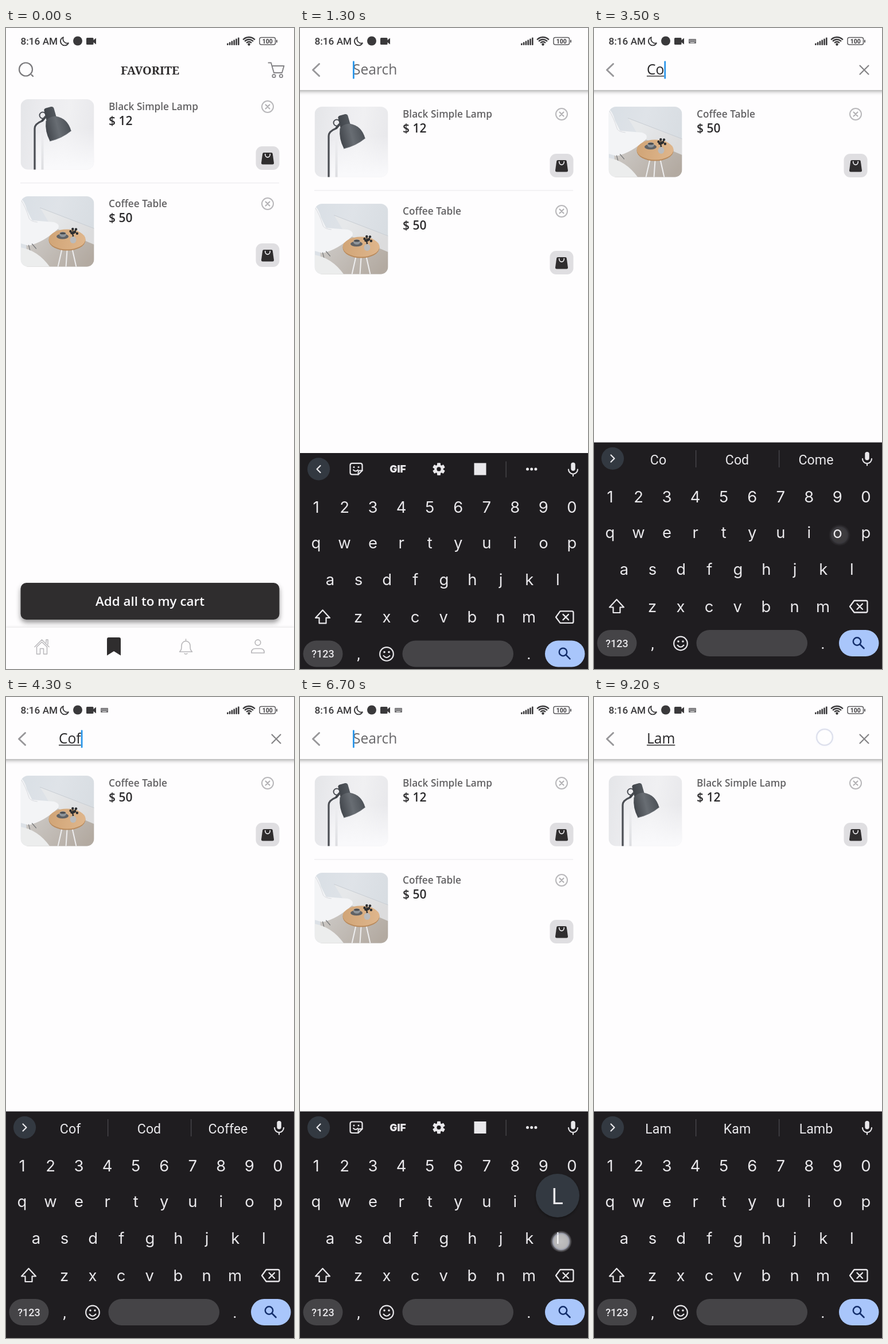
Write an HTML page with a canvas that moves like this. It is 502 px wide and 1116 px high and loops after 9.3 s.

```html
<!DOCTYPE html>
<html lang="en">
<head>
<meta charset="utf-8">
<title>Favorite search</title>
<style>
  html, body { margin: 0; width: 100%; height: 100%; overflow: hidden; background: #fefdfe; }
  canvas { display: block; width: 502px; height: 1116px; }
</style>
</head>
<body>
<canvas id="stage" width="502" height="1116"></canvas>
<script>
const W = 502, H = 1116, LOOP = 9300, STEP = 100;
const SANS = '"Open Sans", "Noto Sans", sans-serif';
const UI = 'Roboto, "Noto Sans", sans-serif';
const KEY = 'Inter, Roboto, sans-serif';
const SERIF = '"Noto Serif", serif';
const PAPER = '#fefdfe', INK = '#2f2d2e', KEYS = '#1f1d20', LIGHT = '#e9e8eb';

const screen = document.getElementById('stage').getContext('2d');
const layerCanvas = document.createElement('canvas');
layerCanvas.width = W;
layerCanvas.height = H;
const layer = layerCanvas.getContext('2d');
let c = screen;

// Drawing helpers
function fill(d, color) {
  c.fillStyle = color;
  c.fill(new Path2D(d));
}
function line(d, color, width) {
  c.strokeStyle = color;
  c.lineWidth = width;
  c.lineCap = c.lineJoin = 'round';
  c.stroke(new Path2D(d));
}
function box(x, y, w, h, r, color) {
  c.fillStyle = color;
  c.beginPath();
  c.roundRect(x, y, w, h, r);
  c.fill();
}
function oval(x, y, rx, ry, color) {
  c.fillStyle = color;
  c.beginPath();
  c.ellipse(x, y, rx, ry, 0, 0, 7);
  c.fill();
}
function dot(x, y, r, color) {
  oval(x, y, r, r, color);
}
function ring(x, y, r, color, width) {
  c.strokeStyle = color;
  c.lineWidth = width;
  c.beginPath();
  c.arc(x, y, r, 0, 7);
  c.stroke();
}
function text(s, x, y, font, color, align = 'left') {
  c.font = font;
  c.fillStyle = color;
  c.textAlign = align;
  c.fillText(s, x, y);
}
function blend(x0, y0, x1, y1, ...colors) {
  const g = c.createLinearGradient(x0, y0, x1, y1);
  colors.forEach((color, i) => g.addColorStop(i / (colors.length - 1), color));
  return g;
}
function shadow(color, blur, dy) {
  c.shadowColor = color;
  c.shadowBlur = blur;
  c.shadowOffsetY = dy;
}
function at(x, y, draw) {
  c.save();
  c.translate(x, y);
  draw();
  c.restore();
}

// Pictures, drawn in a 128 x 123 box
function lampPhoto() {
  fill('M0 0H128V123H0z', blend(0, 0, 128, 20, '#e4e5e8', '#ececef', '#f0f0f2', '#e9e9ec'));
  fill('M28 123V60L128 40V123z', blend(0, 50, 0, 118, 'rgba(249,249,251,0)', '#f9f9fb'));
  line('M38 123V54', blend(0, 54, 0, 123, 'rgba(190,192,197,0)', 'rgba(190,192,197,.5)'), 4);
  line('M24.5 124V51Q24.5 43 37 38', '#4b4e54', 3.2);
  line('M38 37L43 31', '#3d4147', 4);
  ring(38.5, 28, 5.5, '#4b4e54', 2);
  fill('M41 20Q40 17 44 15.5L53 13Q57 12.5 58 16L62 30 45 37z', blend(41, 24, 61, 20, '#3f4349', '#555a60'));
  fill('M44 38Q49 30 61 29.5Q82 33 88 55Q72 68 51 73Q42 56 44 38z', blend(44, 52, 84, 42, '#43474d', '#686d73', '#4d5258'));
  line('M51 73Q72 68 88 55', '#70757b', 1);
}
function tablePhoto() {
  fill('M0 0H128V123H0z', blend(0, 0, 128, 40, '#d9dfe5', '#dfe3e8', '#d8dde2'));
  fill('M34 20L128 56V84L58 60z', blend(60, 30, 110, 75, '#e6e8ea', '#dcdcdd'));
  line('M34 20L128 56', '#c8cdd3', 1);
  fill('M10 78L62 56 128 84V123H10z', blend(40, 60, 110, 123, '#cac6c2', '#b3aaa1'));
  fill('M0 4Q7 8 11 24L20 42 58 45Q70 49 65 57Q40 80 14 86L0 82z', '#f3f4f6');
  line('M1 7Q8 17 15 39Q18 44 29 45', '#d8dade', 1);
  line('M14 85L17 97M20 83L27 91', '#77787a', 1.2);
  fill('M0 89Q30 94 51 123H0z', '#eceded');
  line('M72 92L65 123M81 94L79 123M90 92L97 123', '#eeeeef', 2);
  oval(81, 76.5, 32, 18, '#b98a5c');
  oval(81, 75, 32, 17.5, blend(50, 70, 113, 78, '#d1a577', '#dfb68c'));
  oval(73, 70, 10.5, 4.5, '#606265');
  oval(73.5, 66.5, 6, 4.5, '#8f959a');
  oval(73.5, 64.5, 5, 1.8, '#4b4d50');
  line('M91 72V58M91 66L97 57M92 69L87 60', '#2d2e30', 1.8);
  for (let i = 0; i < 7; i++) dot(87 + i * 1.9, 61 + 4 * Math.sin(i * 2.3), 2.2, '#2d2e30');
  oval(91.5, 76, 5.5, 6, '#bbbbbc');
}

const lamp = { name: 'Black Simple Lamp', price: '$ 12', photo: lampPhoto };
const table = { name: 'Coffee Table', price: '$ 50', photo: tablePhoto };

function photos(items, top) {
  items.forEach((item, i) => at(25.5, top + i * 169, () => {
    c.beginPath();
    c.roundRect(0, 0, 128, 122.5, 13);
    c.clip();
    item.photo();
  }));
}
function details(items, top) {
  items.forEach((item, i) => at(0, top + i * 169, () => {
    text(item.name, 179, 18.5, '600 17.2px ' + SANS, '#636264');
    text(item.price, 179, 45, '600 21px ' + SANS, '#2c2b2d');
    ring(456, 13, 10, '#b9b8bb', 2);
    line('M452.5 9.5l7 7m0-7l-7 7', '#b0afb2', 2);
    box(435.5, 82, 41, 41, 11, '#dfdee1');
    fill('M449.5 93h13q2 0 2.3 2l2.2 16q0 2.5-2.5 2.5h-17q-2.5 0-2.5-2.5l2.2-16q.3-2 2.3-2z', INK);
    line('M451.7 95.5c0 7.5 8.6 7.5 8.6 0', '#eeedf0', 1.7);
    if (i < items.length - 1) box(25, 145, 451, 1.5, 0, '#efeef1');
  }));
}

function favoritePage() {
  box(0, 0, W, H, 0, PAPER);
  ring(34.5, 72, 11.5, '#7a797c', 2.2);
  line('M44.5 81.5l2.5 2.5', '#7a797c', 2.4);
  text('FAVORITE', 251, 81, '700 20px ' + SERIF, INK, 'center');
  line('M457.5 60.5h4.5l5 17.5h14l3.5-12H464', '#858487', 2);
  ring(467, 83.5, 2.7, '#858487', 1.8);
  ring(479.5, 83.5, 2.7, '#858487', 1.8);
  details([lamp, table], 124);

  c.save();
  shadow('rgba(0,0,0,.42)', 9, 5);
  box(25.5, 966, 451, 64, 10, INK);
  c.restore();
  text('Add all to my cart', 251, 1006, '600 22.4px ' + SANS, '#fbfafc', 'center');

  c.save();
  shadow('rgba(0,0,0,.1)', 4, -1);
  box(0, 1044, W, 72, 0, PAPER);
  c.restore();
  const gray = '#b8b7ba';
  line('M50 1077.5L62.5 1065 75 1077.5M53.5 1077.5V1090H59.5V1080.5H65.5V1090H71.5V1077.5L62.5 1069zM70 1070v-5h3v8', gray, 1.5);
  fill('M179 1061h18q3 0 3 3v28.5l-12-7.5-12 7.5v-28.5q0-3 3-3z', INK);
  line('M302.5 1086c3.5-3 3.5-6 3.5-11a7.5 7.5 0 0 1 15 0c0 5 0 8 3.5 11zM313.5 1064v3M311 1089q2.5 2 5 0', gray, 1.6);
  ring(439, 1070, 4.8, gray, 1.7);
  line('M428 1088v-1.5q0-6 7-6h8q7 0 7 6v1.5z', gray, 1.7);
}

function searchPage(query, items, cursor) {
  box(0, 0, W, H, 0, PAPER);
  c.save();
  shadow('rgba(0,0,0,.38)', 7, 2);
  box(-10, 0, W + 20, 108, 0, PAPER);
  c.restore();
  line('M33.5 62.5L22.5 73l11 10.5', '#98979a', 3);
  const font = '400 24.6px ' + SANS;
  text(query || 'Search', 92, 81, font, query ? '#29282a' : '#69686b');
  const width = query ? c.measureText(query).width : 0;
  if (query) {
    box(92, 83, width, 1.4, 0, '#29282a');
    line('M463.5 65.5l15 15m0-15l-15 15', '#858487', 2.2);
  }
  if (cursor) box(92 + width, 57.5, 2.8, 31, 1, '#2a96ea');
  details(items, 137);
}

// Keyboard
const rows = [
  { x: 28, step: 49.55, y: 826, low: '1234567890', high: '!@#$%^&*()' },
  { x: 28, step: 49.55, y: 887.5, low: 'qwertyuiop' },
  { x: 52.5, step: 49.6, y: 951.5, low: 'asdfghjkl' },
  { x: 101.5, step: 49.6, y: 1017, low: 'zxcvbnm' }
];
const hints = {
  C: ['C', 'Can', 'Come'], Co: ['Co', 'Cod', 'Come'], Cof: ['Cof', 'Cod', 'Coffee'],
  L: ['L', 'Lol', 'Love'], La: ['La', 'Lab', 'Last'], Lam: ['Lam', 'Kam', 'Lamb']
};

function toolbar() {
  line('M91 739.5h14q3.5 0 3.5 3.5v9l-7 7H91q-3.5 0-3.5-3.5V743q0-3.5 3.5-3.5z', LIGHT, 2.2);
  line('M93 751q4 4 8 0M101.5 759v-4q0-3 3-3h4', LIGHT, 2);
  dot(94, 746, 1.5, LIGHT);
  dot(102, 746, 1.5, LIGHT);
  text('GIF', 170.5, 756, '900 17.5px ' + KEY, LIGHT, 'center');
  at(242, 749.5, () => {
    dot(0, 0, 7.8, LIGHT);
    for (let i = 0; i < 6; i++) {
      c.rotate(Math.PI / 3);
      box(-3, -10.8, 6, 6, 1, LIGHT);
    }
    dot(0, 0, 3.6, KEYS);
  });
  box(303.5, 739, 21, 21, 0, LIGHT);
  box(358.5, 736, 1.3, 28, 0, '#4a494d');
  for (let i = 0; i < 3; i++) dot(396.5 + i * 7.2, 749.5, 2.5, LIGHT);
}

function keyboard(query, shift, drop) {
  at(0, drop, () => {
    box(0, 721.5, W, 420, 0, KEYS);
    dot(32.5, 749.5, 19.6, '#333941');
    line(query ? 'M29.5 743.5l6 6-6 6' : 'M35.5 743.5l-6 6 6 6', LIGHT, 2.2);
    if (query) {
      hints[query].forEach((word, i) =>
        text(word, 112 + i * 137.5, 759.5, '400 23.2px ' + UI, LIGHT, 'center'));
      box(177, 735, 1.3, 30, 0, '#4a494d');
      box(322, 735, 1.3, 30, 0, '#4a494d');
    } else toolbar();
    box(472.3, 738, 7.5, 14.5, 3.7, LIGHT);
    line('M468 750a8 8 0 0 0 16 0M476 758.5v3', LIGHT, 2.1);

    for (const { x, step, y, low, high } of rows) {
      const keys = shift ? high || low.toUpperCase() : low;
      [...keys].forEach((k, i) => text(k, x + i * step, y, '400 27.5px ' + KEY, LIGHT, 'center'));
    }
    const arrow = 'M39.5 995l12.5 13.5h-6.5v9.5h-12v-9.5H27z';
    if (shift) fill(arrow, LIGHT);
    line(arrow, LIGHT, 2.2);
    line('M453.5 997H474q2.5 0 2.5 2.5v15.5q0 2.5-2.5 2.5H453.5L446 1007.3z', LIGHT, 2.3);
    line('M458.5 1002.5l9.5 9.5m0-9.5l-9.5 9.5', LIGHT, 2.3);

    box(5.5, 1048, 69, 46, 23, '#454447');
    text('?123', 40, 1078, '500 18px ' + UI, LIGHT, 'center');
    text(',', 102, 1081, '400 28px ' + UI, LIGHT, 'center');
    ring(151, 1071.5, 11.8, LIGHT, 2.2);
    dot(147, 1068, 1.8, LIGHT);
    dot(155, 1068, 1.8, LIGHT);
    line('M145.5 1074.5q5.5 6.5 11 0', LIGHT, 2.1);
    box(178.5, 1048, 193.5, 46, 23, '#454447');
    text('.', 399, 1081, '400 28px ' + UI, LIGHT, 'center');
    box(427, 1048, 69.5, 46, 23, '#a9c6fb');
    ring(458.5, 1068, 6.7, '#132e6b', 2.5);
    line('M463.5 1073l7 7', '#132e6b', 2.6);
  });
}

function statusBar(withKeyboard) {
  const ink = '#3a393b';
  text('8:16 AM', 25.5, 29, '500 17.2px ' + UI, ink);
  line('M100 16a7.4 7.4 0 1 0 9 10.2a7.5 7.5 0 0 1-9-10.2z', ink, 1.8);
  dot(125, 22.5, 8, ink);
  box(140, 17, 12.5, 12, 1.5, ink);
  fill('M152 21.5l5-4v11l-5-4z', ink);
  if (withKeyboard) {
    box(165, 19, 13, 8, 1, '#6f6e71');
    for (let i = 0; i < 10; i++) box(166.3 + (i % 5) * 2.3, 20.5 + (i / 5 | 0) * 2.3, 1, 1, 0, PAPER);
    box(168, 25, 7, 1, 0, PAPER);
  }
  for (let i = 0; i < 6; i++) box(385 + i * 3.8, 26.5 - i * 2, 2.6, 3.5 + i * 2, 1, ink);
  c.lineCap = 'butt';
  for (let r = 6; r < 15; r += 4) {
    c.strokeStyle = ink;
    c.lineWidth = 2.3;
    c.beginPath();
    c.arc(423.5, 30, r, -2.4, -0.74);
    c.stroke();
  }
  dot(423.5, 28.5, 2.2, ink);
  line('M445 16.5h21.5q3 0 3 3v6.5q0 3-3 3H445q-3 0-3-3v-6.5q0-3 3-3z', '#5c5b5e', 1.5);
  box(471, 20.5, 2, 5, 1, '#5c5b5e');
  text('100', 455.8, 26.7, '700 10.5px ' + UI, ink, 'center');
}

// Timeline
const edits = [[1100, ''], [2800, 'C'], [3300, 'Co'], [3900, 'Cof'], [5300, ''],
  [6800, 'L'], [7500, 'La'], [8300, 'Lam']];
// down, up, x, y, then the popped key and its place
const taps = [
  [600, 750, 33, 60],
  [2100, 2200, 43, 1012],
  [2600, 2800, 207, 1018, 'C', 200.5, 934],
  [3200, 3300, 428, 883, 'O', 424, 804],
  [3800, 3900, 205, 947, 'F', 200.5, 868],
  [5200, 5300, 473, 76],
  [6200, 6300, 43, 1012],
  [6700, 6800, 455, 948, 'L', 449, 868],
  [7400, 7500, 57, 947],
  [8200, 8300, 404, 1014, 'M', 399, 934],
  [9150, 9300, 402, 70]
];

function popup(key, x, y) {
  c.save();
  shadow('rgba(0,0,0,.35)', 5, 2);
  dot(x, y, 38, '#333941');
  c.restore();
  text(key, x, y + 15, '400 38px ' + KEY, LIGHT, 'center');
  if (key === 'C') for (let i = -1; i < 2; i++) dot(x + i * 5, y + 31, 1.4, LIGHT);
}
function touch(x, y, alpha) {
  const glow = c.createRadialGradient(x, y, 0, x, y, 19);
  glow.addColorStop(0, 'rgba(255,255,255,.72)');
  glow.addColorStop(0.62, 'rgba(255,255,255,.68)');
  glow.addColorStop(0.75, 'rgba(196,201,222,.75)');
  glow.addColorStop(0.82, 'rgba(240,243,252,.35)');
  glow.addColorStop(1, 'rgba(255,255,255,0)');
  c.globalAlpha = alpha;
  dot(x, y, 19, glow);
  c.globalAlpha = 1;
}

const clamp = v => Math.min(1, Math.max(0, v));
// cubic-bezier(.4, 0, .2, 1)
function ease(v) {
  let lo = 0, hi = 1, s = v;
  for (let i = 0; i < 20; i++) {
    s = (lo + hi) / 2;
    const x = 1.2 * s * (1 - s) ** 2 + 0.6 * s * s * (1 - s) + s ** 3;
    if (x < v) lo = s; else hi = s;
  }
  return 3 * s * s * (1 - s) + s ** 3;
}

function render(t) {
  const [since, query] = edits.filter(e => e[0] <= t).pop() || [0, ''];
  const items = [lamp, table].filter(item => item.name.includes(query[0] || ''));
  const cursor = t >= 1100 && Math.floor((t - since) / 500) % 2 === 0;
  const shift = (t >= 2200 && t < 2700) || (t >= 6300 && t < 6700);
  const open = clamp((t - 744) / 300);

  c = screen;
  if (open < 1) favoritePage();
  if (open > 0) {
    c = layer;
    searchPage(query, items, cursor);
    c = screen;
    c.globalAlpha = open;
    c.drawImage(layerCanvas, 0, 0);
    c.globalAlpha = 1;
  }
  photos(items, 124 + 13 * ease(open));
  if (t > 1108) keyboard(query, shift, 395 * (1 - clamp((t - 1108) / 300)) ** 3);
  statusBar(t >= 1500);

  for (const [down, up, x, y, key, kx, ky] of taps) {
    if (t < down) continue;
    if (key && t < up) popup(key, kx, ky);
    const alpha = 1 - clamp((t - up) / 250);
    if (alpha > 0) touch(x, y, alpha);
  }
}

const start = performance.now();
function tick() {
  const t = (performance.now() - start) % LOOP;
  render(Math.floor(t / STEP) * STEP);
  requestAnimationFrame(tick);
}
tick();
</script>
</body>
</html>
```
